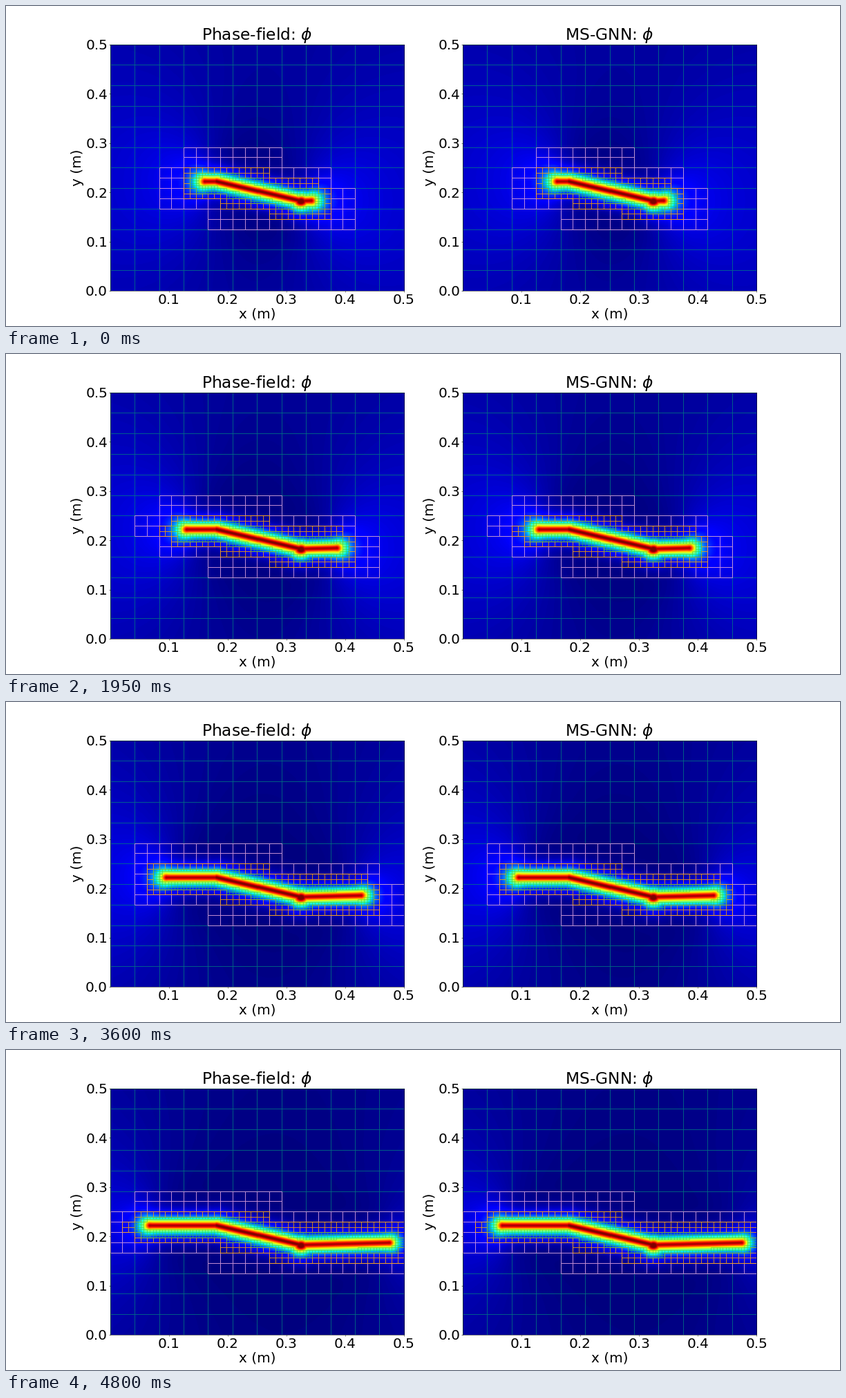
Write a matplotlib script that moves like this. It is 1207 px wide and 464 px high and loops after 4.85 s.

```python
import numpy as np
import matplotlib.pyplot as plt
from matplotlib.animation import FuncAnimation
from matplotlib.collections import LineCollection

W, H, DPI = 1207, 464, 64
FRAMES, STEP = 97, 50
PX = 72 / DPI                  # one pixel in points
SIDE = 0.5                     # plate size in metres
NX, NY = 425, 357              # field resolution

plt.rcParams.update({
    "font.family": "DejaVu Sans",
    "mathtext.fontset": "dejavusans",
    "font.size": 20 * PX,
    "axes.linewidth": 0.5 * PX,
})

# Crack path: two fixed kinks, two tips that grow outwards
KINK_L, KINK_R = (0.181, 0.222), (0.3235, 0.1825)
KEYS = [0, 17, 29, 48, 72, 83, 96]
TIP_L = [0.1615, 0.1515, 0.1405, 0.122, 0.0961, 0.082, 0.0679]
TIP_R = [0.3405, 0.3575, 0.3715, 0.3955, 0.4255, 0.4445, 0.4735]

# Mesh levels: colour and line width in pixels
LEVELS = [("teal", 0.7), ("plum", 0.85), ("orange", 0.8), ("limegreen", 0.5)]
REFINE, CORE = 0.0163, 0.011


def crack(i):
    left = np.interp(i, KEYS, TIP_L)
    right = np.interp(i, KEYS, TIP_R)
    rise = KINK_R[1] + 0.03 * (right - KINK_R[0])
    return [(left, KINK_L[1]), KINK_L, KINK_R, (right, rise)]


def centres(nx, ny):
    return np.meshgrid((np.arange(nx) + 0.5) * SIDE / nx,
                       (np.arange(ny) + 0.5) * SIDE / ny)


def segment_dist(x, y, a, b):
    (x0, y0), (x1, y1) = a, b
    dx, dy = x1 - x0, y1 - y0
    t = np.clip(((x - x0) * dx + (y - y0) * dy) / (dx * dx + dy * dy), 0, 1)
    return np.hypot(x - x0 - t * dx, y - y0 - t * dy)


X, Y = centres(NX, NY)
FX, FY = centres(96, 96)


def profile(d, peak):
    """Damage across the crack: rounded top, exponential tail."""
    e, l = 0.005, 0.0108
    return peak * np.exp(-(np.sqrt(d * d + e * e) - e) / l)


def tip_glow(tip, side, gain):
    """Weak stress lobe ahead of a crack tip; side is -1 (left) or 1 (right)."""
    dx, dy = X - tip[0], Y - tip[1]
    r = np.hypot(dx, dy) + 1e-9
    u = 0.5 * (1 + side * dx / r)
    return gain * u * u * (3 - 2 * u) * (0.025 / (r + 0.2) + 0.05 * np.exp(-r / 0.03))


def field(i):
    p = crack(i)
    core = np.max([profile(segment_dist(X, Y, a, b), k)
                   for a, b, k in zip(p, p[1:], (0.96, 1.0, 0.96))], axis=0)
    blob = np.hypot((X - KINK_R[0]) * 0.9, Y - KINK_R[1] + 0.001)
    core = np.maximum(core, profile(np.maximum(blob - 0.003, 0), 1.0))
    glow = tip_glow(p[0], -1, np.clip((p[0][0] + 0.055) / 0.15, 0, 1))
    glow += tip_glow(p[3], 1, np.clip((0.555 - p[3][0]) / 0.15, 0, 1))
    return core + glow * (1 - core)


def cell_dist(n, path):
    """Distance from every cell of an n by n grid to the path."""
    pts = np.concatenate([np.linspace(a, b, 70) for a, b in zip(path, path[1:])])
    lo = np.arange(n)[:, None] * SIDE / n
    gx, gy = [np.maximum(np.maximum(lo - c, c - lo - SIDE / n), 0) ** 2 for c in pts.T]
    return np.sqrt((gy[:, None, :] + gx[None, :, :]).min(axis=2))


def grow(m):
    out = m.copy()
    out[1:] |= m[:-1]
    out[:-1] |= m[1:]
    out[:, 1:] |= m[:, :-1]
    out[:, :-1] |= m[:, 1:]
    return out


def pool(m):
    n = len(m) // 2
    return m.reshape(n, 2, n, 2).any(axis=(1, 3))


def split(m):
    return m.repeat(2, axis=0).repeat(2, axis=1)


def edges(leaf):
    """Outline segments of the marked cells, each edge once."""
    h = SIDE / len(leaf)
    pad = np.pad(leaf, 1)
    r, c = np.nonzero((pad[:, 1:] | pad[:, :-1])[1:-1])
    upright = np.stack([c, r, c, r + 1], axis=1)
    r, c = np.nonzero((pad[1:] | pad[:-1])[:, 1:-1])
    level = np.stack([c, r, c + 1, r], axis=1)
    return (np.concatenate([upright, level]) * h).reshape(-1, 2, 2)


def mesh(i):
    """Leaf outlines of the balanced quadtree, coarse to fine."""
    path = crack(i)
    m3 = cell_dist(48, path) < REFINE
    m2 = pool(grow(m3))
    m1 = pool(grow(m2))
    near = np.min([segment_dist(FX, FY, a, b) for a, b in zip(path, path[1:])], axis=0)
    leaves = [~m1, split(m1) & ~m2, split(m2) & ~m3, split(m3) & (near > CORE)]
    return [edges(leaf) for leaf in leaves]


fig, axes = plt.subplots(1, 2, figsize=(W / DPI, H / DPI), dpi=DPI)
fig.subplots_adjust(left=0.12488, right=0.89988, bottom=0.11, top=0.88, wspace=0.2)

images, grids = [], []
for ax, name in zip(axes, ("Phase-field", "MS-GNN")):
    images.append(ax.imshow(np.zeros((NY, NX)), cmap="jet", vmin=0, vmax=1,
                            origin="lower", extent=(0, SIDE, 0, SIDE),
                            aspect="auto", interpolation="nearest"))
    group = []
    for k, (color, lw) in enumerate(LEVELS):
        lines = LineCollection([], colors=color, linewidths=lw * PX, zorder=1.5 + 0.1 * k)
        group.append(ax.add_collection(lines, autolim=False))
    grids.append(group)
    ax.set(xlim=(0, SIDE), ylim=(0, SIDE))
    ax.set_xticks(np.arange(1, 6) / 10)
    ax.set_yticks(np.arange(6) / 10)
    ax.tick_params(length=1.75 * PX, width=0.5 * PX, pad=1.9 * PX)
    ax.set_xlabel("x (m)", labelpad=2 * PX)
    ax.set_ylabel("y (m)", labelpad=2 * PX)
    ax.set_title(name + r": $\phi$", fontsize=23.4 * PX, pad=5 * PX)


def draw(i):
    phi, outlines = field(i), mesh(i)
    for image, group in zip(images, grids):
        image.set_data(phi)
        for lines, segs in zip(group, outlines):
            lines.set_segments(segs)
    return images + sum(grids, [])


anim = FuncAnimation(fig, draw, frames=FRAMES, interval=STEP, repeat=True,
                     repeat_delay=0, blit=False)
plt.show()
```
